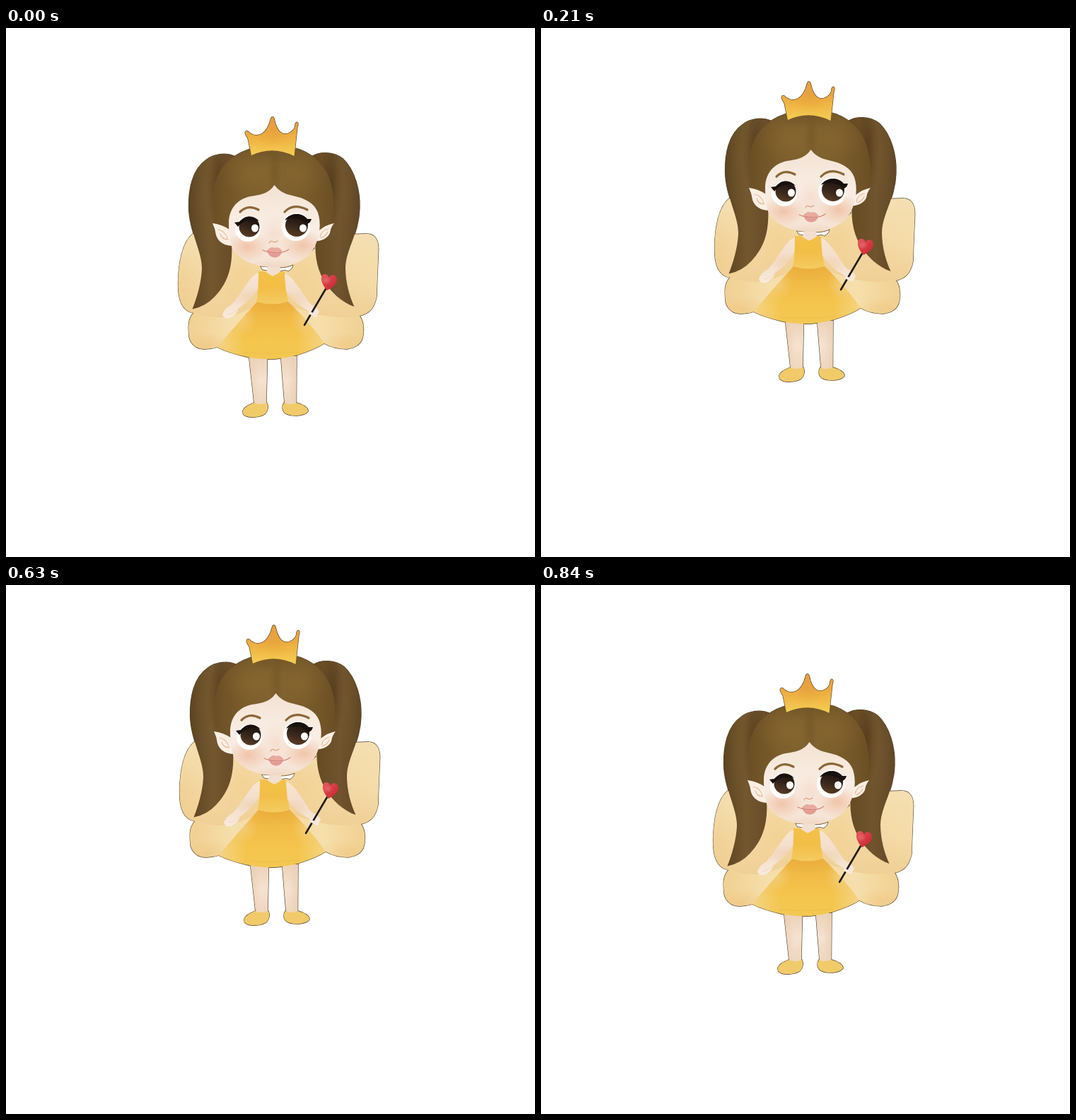
Write an HTML page with a canvas that moves like this. It is 748 px wide and 748 px high and loops after 0.91 s.

```html
<!DOCTYPE html>
<html lang="en">
<head>
<meta charset="utf-8">
<title>Jumping fairy</title>
<style>
html, body { margin: 0; width: 100%; height: 100%; overflow: hidden; background: #fff; }
canvas { display: block; }
</style>
</head>
<body>
<canvas id="stage" width="748" height="748"></canvas>
<script>
const SIZE = 748, LOOP = 910;
const ctx = document.getElementById('stage').getContext('2d');
const sprite = document.createElement('canvas');
sprite.width = sprite.height = SIZE;
const g = sprite.getContext('2d');

// Hop poses: start time, horizontal and vertical offset.
const poses = [
  [0, 0, 0], [70, 1, -15], [140, 1, -32], [210, 2, -50], [280, 2, -68],
  [350, 1, -85], [630, 2, -69], [700, 2, -44], [770, 1, -19], [840, 0, 0]
];

const parts = {
  lowerWings: 'M266 402C256 412 258 425 259 437C262 450 272 454 281 454Q291 454 300 451L374 430L450 446Q464 454 482 454C497 452 504 444 505 434C507 423 504 412 500 407L450 385L300 385Z',
  upperWings: 'M264 291C249 303 244 333 243.500 360C243 382 248 401 266 403Q293 412 319 408L374 385L440 405Q472 412 500 407C514 404 521 396 524 380L525 350L526.500 318C528 300 522 291 510 291L494 291.500L438 300L378 325L320 300Z',
  leftTail: 'M323 181C310 175.500 293 178.500 283 186.500C263 200 258 229 258.500 254C259 287 278 318 277 341C276 361 270 381 263.500 397.500Q282 394 295 380C316 358 321 334 319 300L310 230Z',
  rightTail: 'M432 182C444 174 463 175 476 184.500C494 201 501 232 500 255C499 291 481 312 480 339C480 360 486 380 492.500 394C475 388 459 374 449 356C438 338 436 315 438 290L452 230Z',
  scalp: 'M297 279C290 250 291 221 304 200C321 176 350 167 379 166C413 166 440 179 453 204C464 224 466 252 460 279L440 299H315Z',
  face: 'M379.500 222C372 234 360 236 346 238C326 242 316 256 315 274C315 291 316 305 322 315C337 333 358 338 380 338C408 338 428 326 436 310C444 294 446 276 441 261C436 248 424 241 405 237C391 234 385 229 379.500 222Z',
  leftEar: 'M292 276Q306 278 316 285L320 308C310 308 300 303 297 293Q296 284 292 276Z',
  rightEar: 'M464 276Q453 278 443 286L437 301C446 302 455 297 458 290Q459 282 464 276Z',
  crown: 'M347 180L342 156Q337 149 338.500 146.500Q341 144 344 148C357 157 369 149 374 130Q375 126 376.500 126Q379 126 379.500 130C383 146 391 155 403 147Q409 143 409 136Q410 132.500 412 133.500Q414 135 412 140L407.500 181Q377 166 347 180Z',
  leftLeg: 'M343.500 464H369.500L368 532H351Z',
  rightLeg: 'M388.500 464H411L410.500 532H394Z',
  leftShoe: 'M350 530Q359 534 369 530C371 534 371 541 366 546C357 551.500 341 552 335.500 546C332 538 343 533 350 530Z',
  rightShoe: 'M393 530Q402 534 411 530C419 532 428 537 427 542C422 549 404 550 395 545C390 541 390 534 393 530Z',
  skirt: 'M355 387H399C415 402 438 428 450 446Q438 454 412 462.500Q374 473 338 464.500Q314 459 299 451.500C315 432 337 407 355 387Z',
  bodice: 'M357 344L366 344Q372 349 377 351Q384 348 389 344L394 345Q394 363 399 387Q377 394 354 387Q358 367 357 344Z',
  neck: 'M372 334H387L388 345L377 351L368 345Z',
  leftArm: 'M357 346C344 350 335 374 319 391Q309 396 306 405C308 412 316 412 321 407C326 405 328 399 329 396Q348 384 356 368Z',
  rightArm: 'M394 347C406 351 416 371 430 390Q441 395 443 401Q440 408 433 407L426 399Q407 389 396 372Z',
  heart: 'M454 371C447 364 444 354 447 350C451 346 456 349 457 353C460 346 468 350 468 356C468 363 461 367 454 371Z'
};
for (const name in parts) parts[name] = new Path2D(parts[name]);

function gradient(x0, y0, x1, y1, ...colors) {
  const paint = g.createLinearGradient(x0, y0, x1, y1);
  colors.forEach((color, i) => paint.addColorStop(i / (colors.length - 1), color));
  return paint;
}

function fill(name, paint) {
  g.fillStyle = paint;
  g.fill(parts[name]);
}

function line(d, color, width) {
  g.strokeStyle = color;
  g.lineWidth = width;
  g.stroke(new Path2D(d));
}

function oval(x, y, rx, ry, color) {
  g.fillStyle = color;
  g.beginPath();
  g.ellipse(x, y, rx, ry, 0, 0, Math.PI * 2);
  g.fill();
}

// Soft tints, each [x, y, rx, ry, rgb, alpha], kept inside one part.
function shade(name, ...tints) {
  g.save();
  g.clip(parts[name]);
  for (const [x, y, rx, ry, rgb, alpha] of tints) {
    g.save();
    g.translate(x, y);
    g.scale(rx, ry);
    const paint = g.createRadialGradient(0, 0, 0, 0, 0, 1);
    paint.addColorStop(0, `rgba(${rgb},${alpha})`);
    paint.addColorStop(1, `rgba(${rgb},0)`);
    g.fillStyle = paint;
    g.fillRect(-1, -1, 2, 2);
    g.restore();
  }
  g.restore();
}

// Only the outer half of these strokes stays visible.
function drawOutline() {
  g.strokeStyle = '#514229';
  g.lineWidth = 1.3;
  for (const name of ['lowerWings', 'upperWings', 'leftTail', 'rightTail', 'scalp', 'crown',
    'leftLeg', 'rightLeg', 'leftShoe', 'rightShoe', 'skirt']) g.stroke(parts[name]);
}

function drawWings() {
  fill('lowerWings', gradient(259, 0, 507, 0, '#f1d092', '#f5dfac', '#f3d9a0', '#f5dfac', '#f1d092'));
  shade('lowerWings', [285, 449, 38, 20, '235,185,105', .35], [480, 449, 38, 20, '235,185,105', .35]);
  fill('upperWings', gradient(0, 291, 0, 408, '#f5dfb2', '#f3d9a5', '#f0d096'));
  shade('upperWings', [246, 365, 35, 70, '236,190,112', .25], [525, 350, 45, 45, '246,224,176', .5],
    [335, 350, 40, 55, '242,204,134', .5], [415, 350, 45, 60, '242,204,134', .5]);
  g.fillStyle = '#fff';
  for (const d of ['M360 337L372 338L370 343L363 342Z', 'M386 339Q398 339 406 335Q405 341 399 344Q394 341 388 344Z']) {
    g.fill(new Path2D(d));
    line(d, '#514229', .8);
  }
  line('M432 315L436 311', '#42331f', 1.2);
}

function drawBody() {
  const skin = gradient(0, 465, 0, 532, '#ecd2b9', '#f5e2d0', '#efd6bd');
  fill('leftLeg', skin);
  fill('rightLeg', skin);
  shade('leftLeg', [345, 500, 13, 50, '222,178,142', .3]);
  shade('rightLeg', [411, 500, 13, 50, '222,178,142', .3]);
  fill('leftShoe', '#f1cb69');
  fill('rightShoe', '#f1cb69');
  fill('skirt', gradient(0, 387, 0, 470, '#edb241', '#f2bd47', '#f4c64e', '#f3c752'));
  const veil = 'rgba(244,217,153,0)';
  fill('skirt', gradient(299, 0, 451, 0, 'rgba(244,217,153,.75)', veil, veil, veil, 'rgba(244,217,153,.75)'));
  shade('skirt', [334, 412, 20, 24, '244,217,153', .5], [422, 412, 20, 24, '244,217,153', .5],
    [377, 389, 40, 22, '227,157,48', .3]);
  line('M335 459Q375 462 414 458', 'rgba(222,167,58,.3)', .8);
  fill('neck', '#f3dfcf');
  fill('bodice', gradient(0, 343, 0, 390, '#f3c149', '#f2be46', '#f4cb61'));
  const arm = gradient(0, 345, 0, 410, '#f7e5d5', '#f3ddc9', '#f9eadc');
  fill('leftArm', arm);
  fill('rightArm', arm);
  shade('leftArm', [350, 383, 28, 16, '236,199,150', .5]);
  shade('rightArm', [402, 387, 28, 16, '236,199,150', .5]);
  line('M313 405Q322 404 328 397', 'rgba(230,195,165,.5)', .8);
}

function drawHair() {
  fill('leftTail', gradient(258, 0, 322, 0, '#5b4422', '#73572e', '#684b28'));
  shade('leftTail', [301, 225, 18, 65, '66,45,18', .55], [280, 235, 20, 80, '125,95,47', .35]);
  fill('rightTail', gradient(437, 0, 502, 0, '#664a22', '#70542d', '#5f4626'));
  shade('rightTail', [460, 220, 16, 65, '64,43,17', .5], [480, 235, 17, 80, '125,95,50', .3]);
  fill('scalp', gradient(292, 0, 465, 0, '#6b4f25', '#7a5c2b', '#80622f', '#7a5c2b', '#6b4f25'));
  shade('scalp', [348, 207, 45, 35, '143,111,52', .45], [414, 207, 43, 35, '143,111,52', .4],
    [380, 205, 10, 37, '94,65,25', .3], [378, 172, 65, 22, '88,62,25', .3]);
}

function drawFace() {
  fill('leftEar', '#fbefe3');
  fill('rightEar', '#fbefe3');
  line('M300 285Q311 288 313 298M303 291Q305 299 314 299', '#e5bd9c', 1.2);
  line('M456 284Q446 286 444 295M455 288Q453 294 445 297', '#e5bd9c', 1.2);
  fill('face', gradient(0, 222, 0, 338, '#f4e2d2', '#f9eee5', '#f5e2d3'));
  shade('face', [341, 309, 31, 22, '235,168,127', .55], [419, 307, 31, 22, '235,168,127', .55],
    [380, 290, 24, 28, '236,188,158', .28], [380, 339, 42, 13, '228,186,155', .3]);

  line('M331 260Q342 249 357 257', '#8a6737', 3.2);
  line('M394 260Q406 247 426 257', '#8a6737', 3.2);
  drawEye(342, 284, 18, 344, 281, 14.500, 352, 283);
  drawEye(410, 281, 20, 411, 279, 16, 420, 283);
  g.fillStyle = '#18100c';
  g.fill(new Path2D('M323 275L330 274C337 265 350 264 358 273C350 270 336 270 328 281Z'));
  g.fill(new Path2D('M394 272C402 260 419 261 426 270L432 270Q430 277 425 277C418 268 404 267 394 272Z'));

  line('M372 304Q374 300 377 302Q380 304 384 301', '#dda283', 1.3);
  g.fillStyle = '#e9aaa0';
  g.fill(new Path2D('M368 316C372 310 377 309 380 311C384 309 388 311 391 316Q380 322 368 316Z'));
  g.fillStyle = '#e49c94';
  g.fill(new Path2D('M370 317Q380 321 390 317C387 327 373 327 370 317Z'));
  line('M363 314Q371 318 380 317.500Q391 319 400 313', '#cf857a', 1.2);
}

function drawEye(x, y, r, irisX, irisY, irisR, glintX, glintY) {
  oval(x, y, r, r, '#fffefb');
  oval(irisX, irisY, irisR, irisR, gradient(irisX + 5, irisY - irisR, irisX - 4, irisY + irisR, '#17100b', '#33231a', '#593d24'));
  oval(glintX, glintY, 5, 5.500, '#fffefb');
}

function drawCrown() {
  fill('crown', gradient(0, 126, 0, 181, '#e79c3e', '#eaa640', '#f0ba45', '#f4cf57'));
  shade('crown', [377, 152, 25, 17, '224,145,45', .25]);
}

function drawWand() {
  line('M422 420L452 369', '#211b18', 2.6);
  line('M430 403L438 407', '#f8e8da', 4);
  fill('heart', gradient(447, 350, 465, 368, '#e2575c', '#d83b43', '#c52b34'));
  shade('heart', [453, 357, 7, 6, '242,139,137', .5]);
}

g.lineCap = g.lineJoin = 'round';
[drawOutline, drawWings, drawBody, drawHair, drawFace, drawCrown, drawWand].forEach(draw => draw());

function render(now) {
  const time = now % LOOP;
  const [, dx, dy] = poses.findLast(pose => time >= pose[0]);
  ctx.fillStyle = '#fff';
  ctx.fillRect(0, 0, SIZE, SIZE);
  ctx.drawImage(sprite, dx, dy);
}

const start = performance.now();
function tick() {
  render(performance.now() - start);
  requestAnimationFrame(tick);
}
tick();
</script>
</body>
</html>
```
